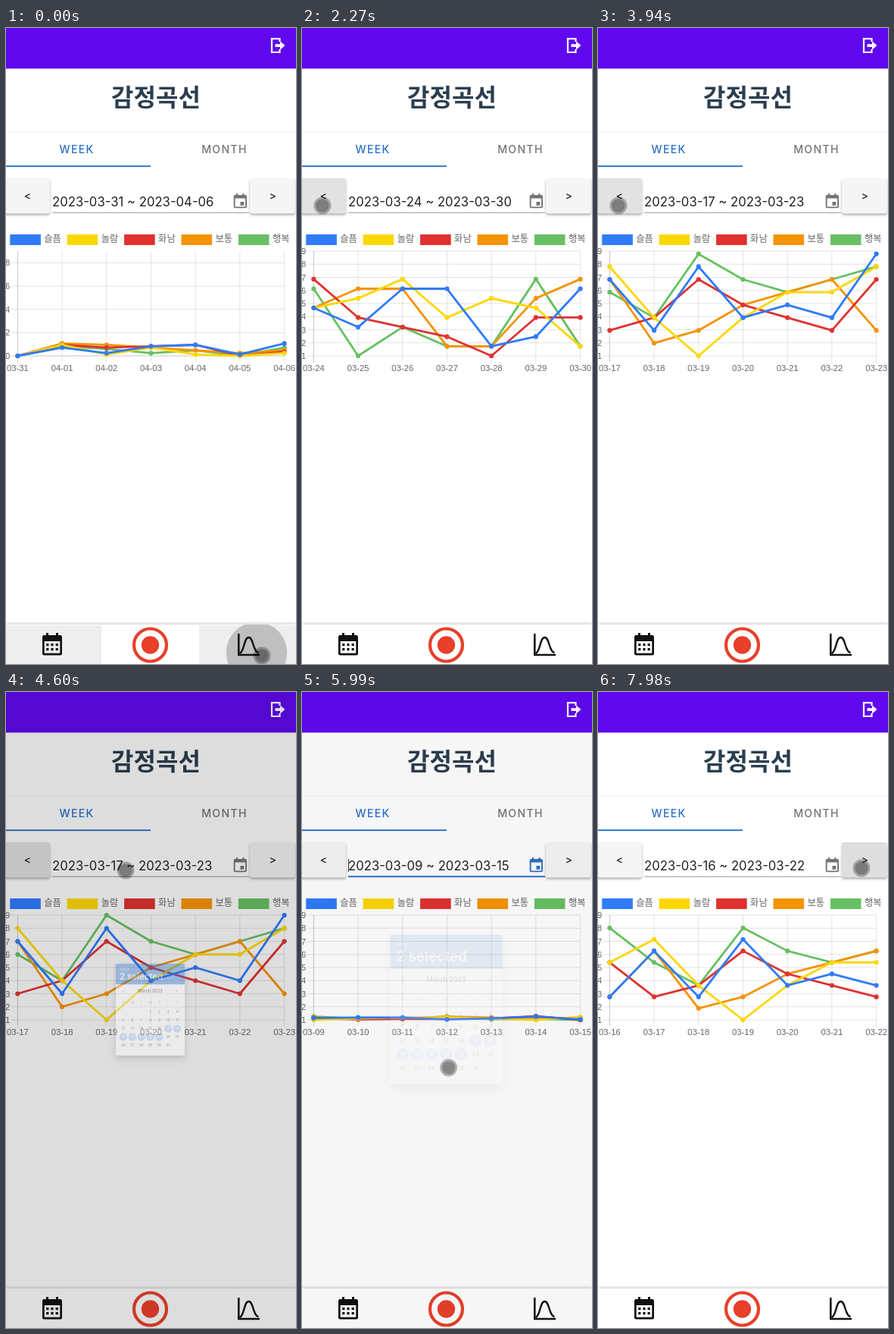
An HTML page for the animation above (8000 ms loop, 383x838 px).

```html
<!DOCTYPE html>
<html lang="ko">
<head>
<meta charset="utf-8">
<title>감정곡선</title>
<style>
  html, body { margin: 0; width: 100%; height: 100%; overflow: hidden; background: #fff; }
  svg { display: block; width: 383px; height: 838px; font-family: Inter, Roboto, sans-serif; }
  .ko { font-family: "Noto Sans CJK KR", "Noto Sans CJK", sans-serif; }
  .tick { font: 11.3px "Liberation Sans", Arial, sans-serif; fill: #666; }
  .mid { text-anchor: middle; }
  .tab { font-size: 14.2px; font-weight: 500; letter-spacing: 1.25px; }
  .btn { fill: #f5f5f5; filter: drop-shadow(0 2px 1.5px rgba(0,0,0,.32)); }
</style>
</head>
<body>
<svg viewBox="0 0 383 838">
  <defs>
    <clipPath id="navClip"><rect x="255" y="786" width="128" height="52"/></clipPath>
  </defs>

  <g id="base">
    <rect width="383" height="838" fill="#fff"/>
    <text class="ko mid" x="198" y="103" font-size="32" font-weight="700" fill="#2c3e50">감정곡선</text>
    <path d="M0 137.5H383" stroke="#f1f1f1"/>
    <text class="tab mid" x="288.5" y="165" fill="#757575">MONTH</text>

    <rect id="prev" class="btn" x="-3" y="198" width="61" height="46.5" rx="3"/>
    <rect id="next" class="btn" x="322" y="198" width="60" height="46.5" rx="3"/>
    <g class="mid" font-size="14" font-weight="500" fill="#222">
      <text x="28.5" y="226">&lt;</text>
      <text x="352.5" y="226">&gt;</text>
    </g>
    <text id="range" x="61" y="234.5" font-size="16.7" fill="#212121"></text>

    <g id="grid" stroke="#000" stroke-opacity=".11"></g>
    <g id="labels"></g>

    <g id="nav">
      <rect y="786" width="383" height="56" fill="#fff" style="filter:drop-shadow(0 -1px 2px rgba(0,0,0,.22))"/>
      <rect id="navLeft" y="787" width="126" height="51"/>
      <rect id="navRight" x="255" y="787" width="128" height="51"/>
      <circle id="ripple" cx="331" cy="823" clip-path="url(#navClip)"/>
      <g fill="#111">
        <path fill-rule="evenodd" d="M50.5 800H53V797H56V800H66V797H69V800H71.500Q74 800 74 802.500V824Q74 826.500 71.500 826.500H50.500Q48 826.500 48 824V802.500Q48 800 50.500 800ZM50.700 808V823.800H71.300V808Z"/>
        <path id="dots"/>
      </g>
      <g fill="none" stroke="#111" stroke-width="2.600">
        <path d="M307.300 798V826H335"/>
        <path d="M308.500 824C315 822 314 803 320.500 803S326 822 333.500 823" stroke-width="2.400"/>
      </g>
    </g>
  </g>

  <rect id="shade" width="383" height="838"/>

  <g id="vivid">
    <rect width="383" height="53.500" fill="#6009ee"/>
    <path d="M361.500 18V14.200H351V32H361.500V28" fill="none" stroke="#fff" stroke-width="2.200"/>
    <path d="M355.500 21.200H362V17.500L368.500 23.100L362 28.700V25H355.500Z" fill="#fff"/>
    <text class="tab mid" x="93.500" y="165" fill="#2d6fc8">WEEK</text>
    <rect y="181.200" width="191" height="1.900" fill="#2d6fc8"/>
    <g id="field">
      <rect id="line" x="61" width="260"/>
      <path fill-rule="evenodd" d="M302.500 220H304V218H306V220H312.500V218H314.500V220H316Q318 220 318 222V235.300Q318 237.300 316 237.300H302.500Q300.700 237.300 300.700 235.300V222Q300.700 220 302.500 220ZM302.600 224.500V235.400H316.100V224.500ZM309.500 229H314.300V233.800H309.500Z"/>
    </g>
    <path id="caret" d="M61.500 220V237" stroke="#333"/>
    <g id="legend"></g>
    <g id="lines"></g>
    <g stroke="#e8402a">
      <circle cx="190.500" cy="813" r="21.500" fill="none" stroke-width="4.200"/>
      <circle cx="190.500" cy="813" r="11.700" fill="#e8402a" stroke="none"/>
    </g>
  </g>

  <g id="dialog">
    <rect x="54" y="237" width="273" height="363" rx="4" fill="#fff"
      style="filter:drop-shadow(0 11px 9px rgba(0,0,0,.25)) drop-shadow(0 14px 19px rgba(0,0,0,.16))"/>
    <path d="M54 319V241Q54 237 58 237H323Q327 237 327 241V319Z" fill="#2f76d5"/>
    <text x="69" y="263.500" font-size="15.200" font-weight="600" fill="#fff" opacity=".7">2023</text>
    <text x="69" y="301" font-size="34.300" font-weight="600" fill="#fff">2 selected</text>
    <text class="mid" x="190.500" y="351.500" font-size="16.700" font-weight="500" fill="#212121">March 2023</text>
    <path d="M88.500 341L83.800 345.800L88.500 350.600M292.500 341L297.200 345.800L292.500 350.600" fill="none" stroke="#555" stroke-width="1.800"/>
    <g id="days" class="mid" font-size="13"></g>
  </g>

  <g id="cursor">
    <circle r="11.500" fill-opacity=".27"/>
    <circle r="8.800" fill-opacity=".24"/>
  </g>
</svg>

<script>
const LOOP = 8000;
const $ = id => document.getElementById(id);
const clamp = x => Math.max(0, Math.min(1, x));
const lerp = (a, b, k) => a + (b - a) * k;
const part = (t, start, span) => clamp((t - start) / span);

function add(parent, name, attrs, text) {
  const el = document.createElementNS("http://www.w3.org/2000/svg", name);
  set(el, attrs);
  if (text !== undefined) el.textContent = text;
  parent.appendChild(el);
  return el;
}
function set(el, attrs) {
  for (const k in attrs) el.setAttribute(k, attrs[k]);
}

// One digit per day, from 9 March to 6 April
const SERIES = [
  { name: "슬픔", color: "#2f7bfb", days: "56624823738454964882380627819" },
  { name: "놀람", color: "#fcd703", days: "14663176841466867957620816102" },
  { name: "화남", color: "#df3230", days: "42334916347543795431550867803" },
  { name: "보통", color: "#f59303", days: "73486363723567368822790986424" },
  { name: "행복", color: "#67c062", days: "84382319649767881422920752406" }
];
const WEEKS = [
  { at: -30, first: 22, min: 0, step: 2 },
  { at: 1990, first: 15, min: 1, step: 1 },
  { at: 3345, first: 8, min: 1, step: 1 },
  { at: 5982, first: 0, min: 1, step: 1 },
  { at: 7572, first: 7, min: 1, step: 1 }
];
const TOP = 294, BOTTOM = 432, MAX = 9;
const colX = i => 15.4 + i * 58.7;
const rowY = (v, min) => BOTTOM - (v - min) / (MAX - min) * (BOTTOM - TOP);
const pad = n => String(n).padStart(2, "0");
function dayLabel(i) {
  const d = i + 9;
  return d > 31 ? "04-" + pad(d - 31) : "03-" + pad(d);
}

// Fixed parts
let dots = "";
for (let r = 0; r < 2; r++)
  for (let c = 0; c < 3; c++) dots += `M${53.2 + c * 6.2} ${811 + r * 6}h3.200v3.200h-3.200z`;
$("dots").setAttribute("d", dots);

SERIES.forEach((s, i) => {
  const x = 5.3 + i * 75.4;
  add($("legend"), "rect", { x, y: 272, width: 40.6, height: 14, fill: s.color });
  add($("labels"), "text", { class: "ko", x: x + 45, y: 282.3, "font-size": 12.3, fill: "#666" }, s.name);
});

for (let i = 0; i < 7; i++)
  add($("grid"), "path", { d: `M${colX(i)} ${TOP}V440`, "stroke-opacity": i ? 0.11 : 0.22 });
const rows = [], rowLabels = [], colLabels = [];
for (let i = 0; i < 9; i++) {
  rows.push(add($("grid"), "path", {}));
  rowLabels.push(add($("labels"), "text", { class: "tick", x: 5.2, "text-anchor": "end" }));
}
for (let i = 0; i < 7; i++)
  colLabels.push(add($("labels"), "text", { class: "tick mid", x: colX(i), y: 452 }));

// First series ends up on top
for (const s of [...SERIES].reverse()) {
  const g = add($("lines"), "g", { fill: s.color });
  s.path = add(g, "path", { fill: "none", stroke: s.color, "stroke-width": 2.8, "stroke-linejoin": "round" });
  s.dots = Array.from({ length: 7 }, (_, i) => add(g, "circle", { cx: colX(i), r: 3.1 }));
}

const dayX = c => 84.3 + c * 35.4;
[..."SMTWTFS"].forEach((ch, c) =>
  add($("days"), "text", { x: dayX(c), y: 397.5, fill: "#a0a0a0", "font-size": 12.5 }, ch));
for (let d = 1; d <= 31; d++) {
  const x = dayX((d + 2) % 7), y = 428.6 + Math.floor((d + 2) / 7) * 32.8;
  const on = d >= 17 && d <= 23;
  if (on) add($("days"), "circle", { cx: x, cy: y, r: 15.2, fill: "#9dbeff" });
  add($("days"), "text", {
    x: x + 0.2, y: y + 4.7, "letter-spacing": 0.4,
    fill: on ? "#fff" : "#222", "font-weight": on ? 700 : 400
  }, d);
}

// Pointer stops: time, x, y
const STOPS = [
  [0, 338, 827], [480, 338, 827], [870, 340, 637], [930, 296, 597], [1000, 261, 565],
  [1110, 170, 475], [1260, 97, 353], [1450, 52, 280], [1670, 28, 243], [1800, 27, 241],
  [2000, 27, 234], [4150, 27, 234], [4430, 158, 235], [4800, 158, 235], [4930, 162, 264],
  [5130, 180, 385], [5340, 195, 490], [5660, 197, 495], [5900, 197, 495], [6200, 186, 495],
  [6850, 186, 495], [7050, 196, 470], [7300, 300, 300], [7500, 348, 232], [8000, 348, 232]
];
const CLICKS = [1930, 3270, 4440, 5800, 7480];

function drawPointer(t) {
  const n = STOPS.findIndex(s => s[0] > t);
  const a = STOPS[n - 1], b = STOPS[n], k = (t - a[0]) / (b[0] - a[0]);
  const hit = CLICKS.some(c => t >= c && t < c + 120);
  set($("cursor"), {
    transform: `translate(${lerp(a[1], b[1], k)} ${lerp(a[2], b[2], k)})`,
    fill: hit ? "#a8a800" : "#000"
  });
  const [ring, core] = $("cursor").children;
  ring.setAttribute("fill-opacity", hit ? 0.65 : 0.27);
  core.setAttribute("fill-opacity", hit ? 0.4 : 0.24);
}

let shown = null;
function showWeek(w) {
  if (w === shown) return;
  shown = w;
  $("range").textContent = `2023-${dayLabel(w.first)} ~ 2023-${dayLabel(w.first + 6)}`;
  colLabels.forEach((el, i) => el.textContent = dayLabel(w.first + i));
  rows.forEach((el, i) => {
    const v = w.min + i * w.step, y = rowY(v, w.min), ok = v <= MAX;
    set(el, { d: ok ? `M7 ${y}H${colX(6)}` : "", "stroke-opacity": v ? 0.11 : 0.22 });
    rowLabels[i].textContent = ok ? v : "";
    rowLabels[i].setAttribute("y", y + 4);
  });
}

function drawChart(t) {
  const w = WEEKS.filter(x => x.at <= t).pop();
  showWeek(w);
  const grow = 1 - (1 - part(t, w.at, 1000)) ** 4;
  for (const s of SERIES) {
    const ys = s.dots.map((_, i) => lerp(BOTTOM, rowY(+s.days[w.first + i], w.min), grow));
    s.path.setAttribute("d", "M" + ys.map((y, i) => `${colX(i)} ${y.toFixed(2)}`).join("L"));
    s.dots.forEach((el, i) => el.setAttribute("cy", ys[i].toFixed(2)));
  }
}

function drawDialog(t) {
  const open = 1 - (1 - part(t, 4563, 300)) ** 3;
  const p = open * (1 - part(t, 5850, 200)) ** 2;
  const size = t < 5850 ? p : lerp(0.5, 1, p);
  set($("dialog"), {
    visibility: p > 0 ? "visible" : "hidden",
    opacity: Math.min(1, p * 1.15),
    transform: `translate(190.5 418.5) scale(${size}) translate(-190.5 -418.5)`
  });
  $("shade").setAttribute("fill-opacity", 0.4 * p);
  $("vivid").style.filter = p > 0 ? `brightness(${1 - 0.12 * Math.min(1, p * 3)})` : "none";
}

function drawControls(t) {
  const focus = t >= 5860 && t < 7520;
  set($("field"), { fill: focus ? "#2d6fc8" : "#757575" });
  set($("line"), { y: focus ? 242.2 : 242.8, height: focus ? 2 : 1, "fill-opacity": focus ? 1 : 0.75 });
  set($("caret"), { visibility: focus && (t - 5900) % 1000 < 520 ? "visible" : "hidden" });
  $("prev").style.fill = t > 1680 && t < 5860 ? "#e2e2e2" : "#f5f5f5";
  $("next").style.fill = t > 7420 ? "#dedede" : "#f5f5f5";

  const spread = part(t, 0, 260);
  $("navLeft").setAttribute("fill-opacity", 0.065 * (1 - part(t, 40, 220)));
  $("navRight").setAttribute("fill-opacity", t < 1940 ? lerp(0.065, 0.16, part(t, 60, 300)) : 0);
  set($("ripple"), { r: lerp(40, 110, spread), "fill-opacity": 0.2 * (1 - part(t, 120, 380)) });
}

function draw(now) {
  const t = now % LOOP;
  drawChart(t);
  drawDialog(t);
  drawControls(t);
  drawPointer(t);
}

const begin = performance.now();
function frame() {
  draw(performance.now() - begin);
  requestAnimationFrame(frame);
}
frame();
</script>
</body>
</html>
```
